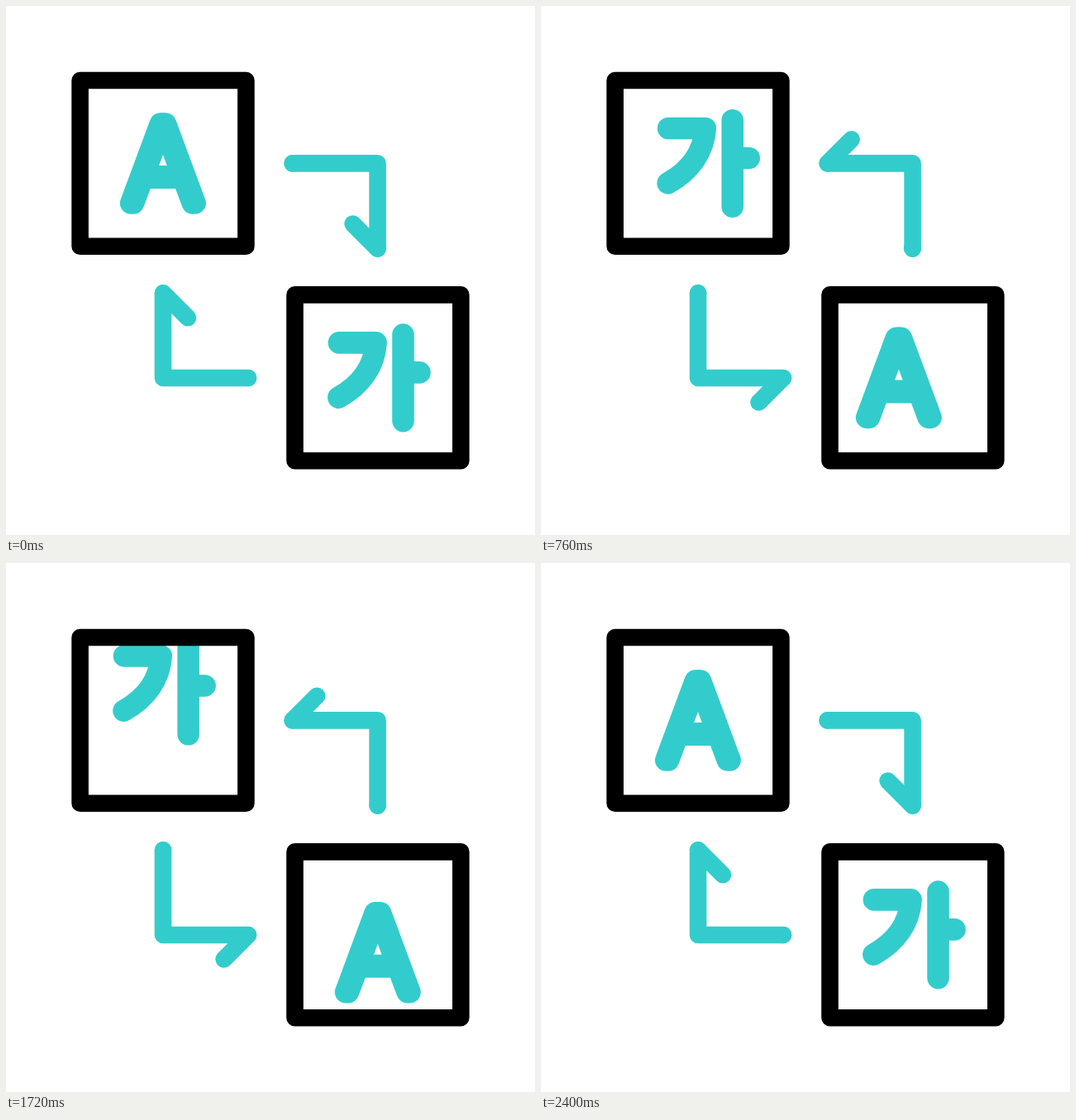
An HTML page that plays this animation: 640x640 px, repeating every 2800 ms.

```html
<!DOCTYPE html>
<html lang="en">
<head>
<meta charset="utf-8">
<title>Translate icon</title>
<style>
  html, body { margin: 0; width: 100%; height: 100%; overflow: hidden; background: #fff; }
  svg { display: block; width: 100%; height: 100%; }
  .frame { fill: none; stroke: #000; stroke-width: 20.6; stroke-linejoin: round; }
  .arrow { fill: none; stroke: #3cc; stroke-width: 20.6; stroke-linecap: round; stroke-linejoin: round; }
  .glyph { fill: #3cc; stroke: #3cc; stroke-width: 26.6; stroke-linecap: round; stroke-linejoin: round; }
</style>
</head>
<body>
<svg viewBox="0 0 640 640">
  <defs>
    <clipPath id="inside"><rect x="95" y="95" width="190" height="190"/></clipPath>
    <g id="latin" class="glyph">
      <path d="M186.8 142.5 L151.2 238.5 H154.1 L189.7 142.5 Z"/>
      <path d="M193 142.5 L228.6 238.5 H225.7 L190.1 142.5 Z"/>
      <path d="M172 193 H208 V221 H172 Z" stroke="none" style="stroke: none"/>
    </g>
    <g id="hangul" class="glyph" style="fill: none">
      <path d="M143 148 H187.7 C186 176.5 169 199.5 142.5 214.3"/>
      <path d="M220.6 138.2 V242.8 M220.6 184 H240.6"/>
    </g>
  </defs>

  <g>
    <g clip-path="url(#inside)">
      <use id="topLatin" href="#latin"/>
      <use id="topHangul" href="#hangul"/>
    </g>
    <rect class="frame" x="89.6" y="90" width="200.8" height="200.8"/>
  </g>
  <g transform="translate(259.9 259.4)">
    <g clip-path="url(#inside)">
      <use id="lowLatin" href="#latin"/>
      <use id="lowHangul" href="#hangul"/>
    </g>
    <rect class="frame" x="89.6" y="90" width="200.8" height="200.8"/>
  </g>

  <g class="arrow">
    <path d="M346.6 190.4 H449.6 V293.6"/>
    <path id="rightDown"/>
    <path id="rightBack"/>
    <path d="M293 450 H190 V347.2"/>
    <path id="leftUp"/>
    <path id="leftOut"/>
  </g>
</svg>
<script>
  const LOOP = 2800, TICK = 40;
  const el = id => document.getElementById(id);

  // Cubic bezier (0.6, 0, 0.2, 1), solved by bisection.
  function ease(x) {
    if (x <= 0) return 0;
    if (x >= 1) return 1;
    let lo = 0, hi = 1;
    for (let i = 0; i < 30; i++) {
      const s = (lo + hi) / 2, r = 1 - s;
      if (1.8 * s * r * r + 0.6 * s * s * r + s * s * s < x) lo = s; else hi = s;
    }
    return lo * lo * (3 - 2 * lo);
  }
  const part = (t, start, length) => ease((t - start) / length);

  function move(id, x, y) {
    el(id).setAttribute('transform', `translate(${x} ${y})`);
  }

  function barb(id, x, y, dx, dy, size) {
    el(id).setAttribute('d', `M${x} ${y} l${dx * size} ${dy * size}`);
  }

  function draw(t) {
    const back = t >= 1440;
    if (!back) {
      const top = part(t, 40, 1000), low = part(t, 80, 1000);
      move('topLatin', -193 * top, 0);
      move('topHangul', 193 * (1 - top), 0);
      move('lowHangul', 211.5 * low, 0);
      move('lowLatin', -211.5 * (1 - low), 0);
    } else {
      const top = part(t, 1440, 920), low = part(t, 1480, 920);
      move('topHangul', 0, -211 * top);
      move('topLatin', 0, 211 * (1 - top));
      move('lowLatin', 0, 198 * low);
      move('lowHangul', 0, -198 * (1 - low));
    }

    const right = back ? 1 - part(t, 1705, 600) : part(t, 265, 600);
    const left = back ? 1 - part(t, 1669, 600) : part(t, 205, 600);
    barb('rightDown', 449.6, 293.6, -30, -30, 1 - right);
    barb('rightBack', 346.6, 190.4, 29.6, -29.6, right);
    barb('leftUp', 190, 347.2, 30, 30, 1 - left);
    barb('leftOut', 293, 450, -29.6, 29.6, left);
  }

  // Motion is held at 25 pictures a second.
  const begin = performance.now();
  function tick() {
    const t = (performance.now() - begin) % LOOP;
    draw(Math.floor(t / TICK) * TICK);
    requestAnimationFrame(tick);
  }
  tick();
</script>
</body>
</html>
```
